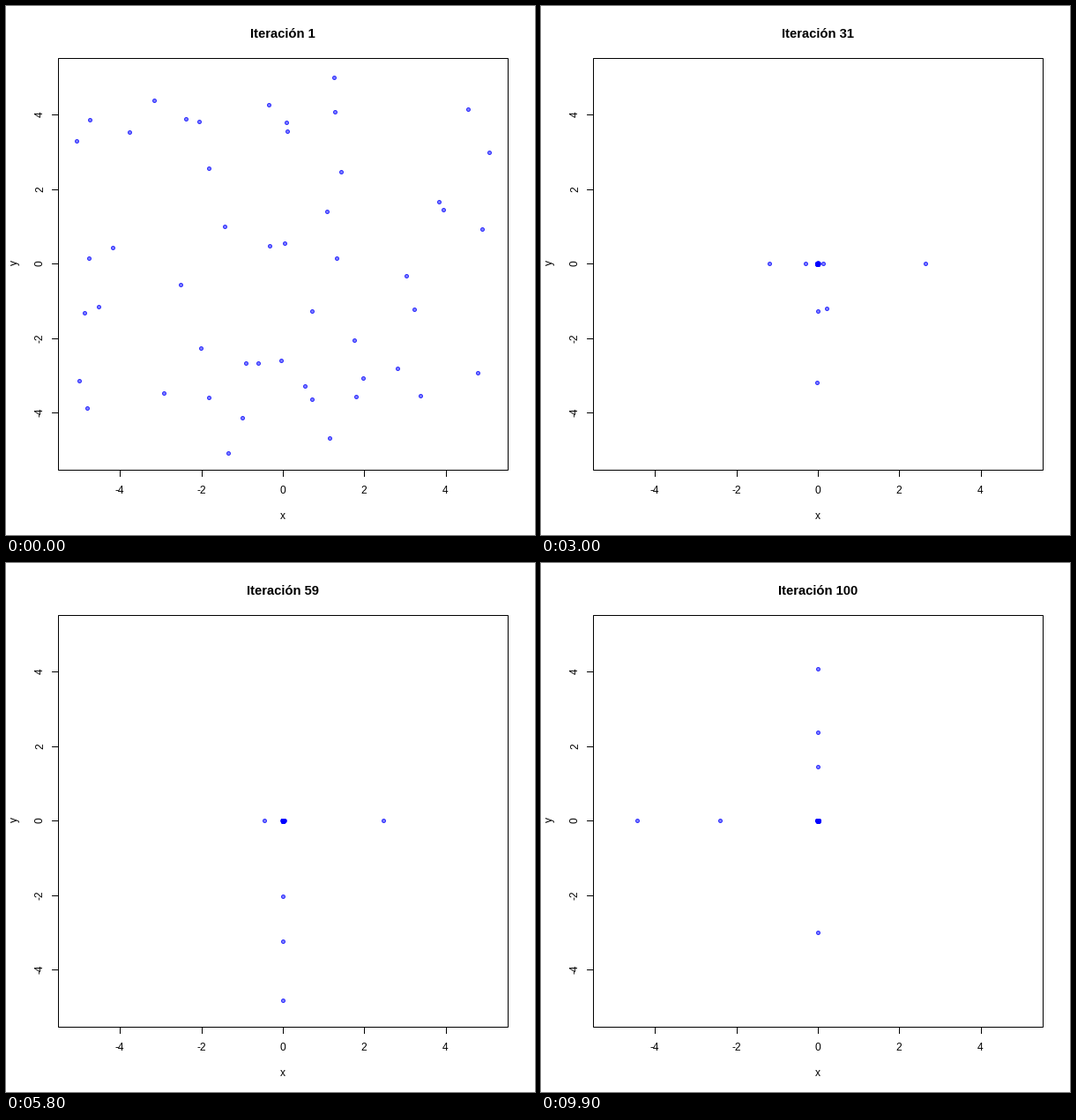
These frames come from a looping animation (600x600 px, 10000 ms). A matplotlib script:

```python
import numpy as np
import matplotlib.pyplot as plt
from matplotlib.animation import FuncAnimation
from matplotlib.patches import Rectangle

SIZE = 600
STEPS = 100
N = 50                               # individuals
LIMIT = 5.12                         # search domain is [-LIMIT, LIMIT]
MUTATION = 0.07
BLEND = 0.35
DRIFT = 0.012
ORIGIN = np.array([314.4, 292.8])    # pixel position of (0, 0)
UNIT = np.array([46.18, -42.27])     # pixels per data unit


def to_px(points):
    """Data coordinates to the centre of the pixel they fall in."""
    return np.floor(ORIGIN + UNIT * points) + 0.5


def breed(rng, pop):
    """Tournament selection, crossover, slight drift, uniform mutation."""
    cost = (pop ** 2).sum(axis=1)

    def pick():
        pairs = rng.integers(0, N, (N, 2))
        best = cost[pairs].argmin(axis=1)
        return pop[pairs[np.arange(N), best]]

    mother, father = pick(), pick()
    child = np.where(rng.random((N, 2)) < 0.5, mother, father)
    w = rng.random((N, 1))
    mixed = w * mother + (1 - w) * father
    child = np.where(rng.random((N, 1)) < BLEND, mixed, child)
    child += rng.normal(0, DRIFT, (N, 2)) * (rng.random((N, 2)) < 0.3)
    fresh = rng.uniform(-LIMIT, LIMIT, (N, 2))
    return np.where(rng.random((N, 2)) < MUTATION, fresh, child)


def evolve(seed):
    rng = np.random.default_rng(seed)
    pops = [rng.uniform(-LIMIT, LIMIT, (N, 2))]
    while len(pops) < STEPS:
        pops.append(breed(rng, pops[-1]))
    return pops


plt.rcParams["font.family"] = "Liberation Sans"
plt.rcParams["path.snap"] = False    # strokes sit on half pixels already
fig = plt.figure(figsize=(SIZE / 72, SIZE / 72), dpi=72, facecolor="white")
ax = fig.add_axes([0, 0, 1, 1])
ax.set_xlim(0, SIZE)
ax.set_ylim(SIZE, 0)
ax.axis("off")


def line(xs, ys):
    ax.plot(xs, ys, color="black", lw=1, solid_capstyle="butt")


def label(x, y, text, size=12, **kw):
    return ax.text(x, y, text, fontsize=size, ha="center", va="baseline",
                   rotation_mode="anchor", **kw)


ax.add_patch(Rectangle((59.5, 59.5), 510, 467, fill=False, ec="black", lw=1))
for v in range(-4, 5, 2):
    px, py = to_px(np.array([v, v]))
    line([px, px], [526, 534])
    line([52, 60], [py, py])
    label(px - 1, 553, str(v))
    label(42, py - 1, str(v), rotation=90)
label(314, 582, "x")
label(13, 291.5, "y", rotation=90)
title = label(314.2, 36, "", 14.7, weight="bold")

pops = evolve(seed=7)
dots = ax.scatter(*to_px(pops[0]).T, s=16, linewidths=[1] * N, zorder=3,
                  facecolors=[(0, 0, 1, 0.5)], edgecolors=[(0, 0, 1, 0.75)])


def update(i):
    title.set_text(f"Iteración {i + 1}")
    dots.set_offsets(to_px(pops[i]))
    return title, dots


anim = FuncAnimation(fig, update, frames=STEPS, interval=100, repeat=True,
                     repeat_delay=0, blit=False)
plt.show()
```
